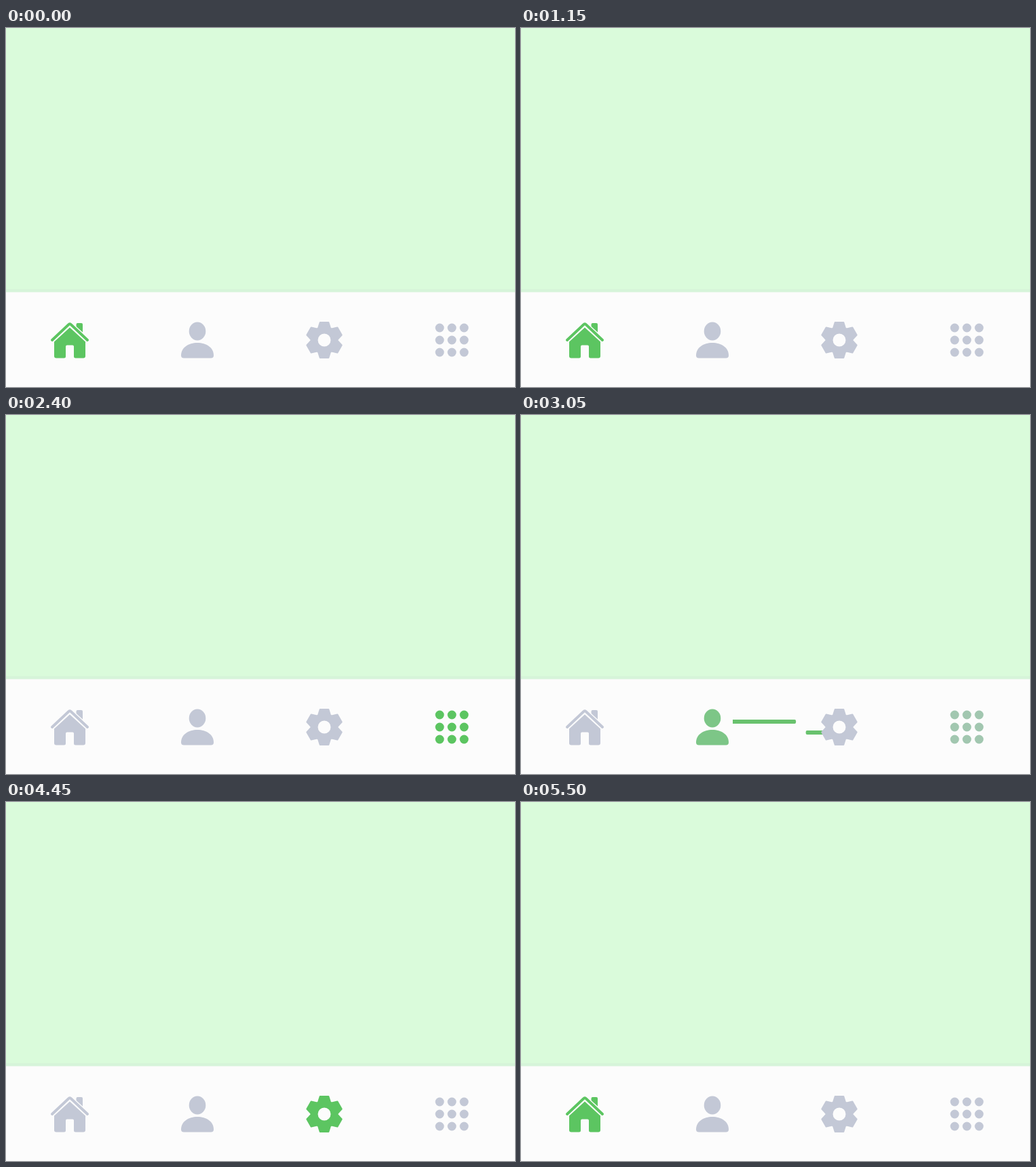
An HTML page that plays this animation: 750 px wide and 528 px high, repeating every 5.55 s.

```html
<!DOCTYPE html>
<html lang="en">
<head>
<meta charset="utf-8">
<title>Tab bar</title>
<style>
  html, body { margin: 0; width: 100%; height: 100%; overflow: hidden; background: #dafbdb; }
  svg { display: block; }
  #stage { width: 750px; height: 528px; }
  .streak { fill: #69c26e; }
</style>
</head>
<body>
<svg id="stage" viewBox="0 0 750 528">
  <rect width="750" height="528" fill="#dafbdb"/>
  <rect y="384" width="750" height="5" fill="#d6f4d9"/>
  <rect y="388.5" width="750" height="139.5" fill="#fcfcfc"/>
  <svg id="track" y="440" height="40" overflow="hidden">
    <rect class="streak" y="8" height="6" rx="2"/>
    <rect class="streak" y="24" height="6" rx="2"/>
  </svg>
  <g class="icon" transform="translate(94 459)">
    <path d="M9.5-14V-23Q9.5-25 11.5-25H17Q19-25 19-23V-7.5Z"/>
    <path d="M-27 0.5L0-24L27 0.5" fill="none" stroke="#fcfcfc" stroke-width="7"/>
    <path d="M0-18.5L23 2.5V23.5Q23 26.5 20 26.5H8.5Q6 26.5 6 24V9.5Q6 7.5 4 7.5H-4Q-6 7.5-6 9.5V24Q-6 26.5-8.5 26.5H-20Q-23 26.5-23 23.5V2.5Z"/>
    <path class="line" d="M-26 0L-2-22.5Q0-25 2-22.5L26 0" fill="none" stroke-width="4" stroke-linecap="round"/>
  </g>
  <g class="icon" transform="translate(282 459)">
    <ellipse cy="-13" rx="12.3" ry="13.4"/>
    <path d="M-24 22.5C-24 11-13 4 0 4S24 11 24 22.5Q24 26.5 20 26.5H-20Q-24 26.5-24 22.5Z"/>
  </g>
  <g class="icon" transform="translate(469 459)"><path id="gear" class="line" fill-rule="evenodd" stroke-width="2" stroke-linejoin="round"/></g>
  <g class="icon" id="dots" transform="translate(657 459)"></g>
</svg>
<script>
const LOOP = 5550, FADE = 400, PAD = 30;
const GRAY = [195, 200, 214], GREEN = [92, 197, 97];
const centers = [94, 282, 469, 657];
const moves = [
  { at: 1560, from: 0, to: 3 },
  { at: 2780, from: 3, to: 1 },
  { at: 3980, from: 1, to: 2 },
  { at: 5040, from: 2, to: 0 }
];
// start of the streak and the travel of its head, as shares of the track
const streaks = [{ start: .33, head: 1.3 }, { start: .01, head: 1.16 }];

const $ = id => document.getElementById(id);
const icons = [...document.querySelectorAll('.icon')];
const bars = [...document.querySelectorAll('.streak')];
const track = $('track');
const clamp = x => Math.max(0, Math.min(1, x));
const smooth = x => x * x * (3 - 2 * x);

function buildGear() {
  const tooth = [[-9, -17.5], [-6.3, -26], [6.3, -26], [9, -17.5]];
  const points = [];
  for (let i = 0; i < 6; i++) {
    const a = i * Math.PI / 3, c = Math.cos(a), s = Math.sin(a);
    for (const [x, y] of tooth) points.push([x * c - y * s, x * s + y * c].map(n => n.toFixed(2)).join(' '));
  }
  $('gear').setAttribute('d', `M${points.join('L')}ZM10.5 0A10.5 10.5 0 1 0-10.5 0A10.5 10.5 0 1 0 10.5 0Z`);
}

function buildDots() {
  let dots = '';
  for (let i = 0; i < 9; i++)
    dots += `<circle cx="${(i % 3 - 1) * 18}" cy="${(Math.floor(i / 3) - 1) * 18}" r="6.5"/>`;
  $('dots').innerHTML = dots;
}

function paint(icon, k) {
  const color = `rgb(${GRAY.map((g, i) => Math.round(g + (GREEN[i] - g) * k)).join()})`;
  icon.setAttribute('fill', color);
  for (const line of icon.querySelectorAll('.line')) line.setAttribute('stroke', color);
}

function drawStreaks(move, u) {
  const v = clamp((u - .3) / .7);
  const running = v > 0 && v < 1;
  track.style.display = running ? '' : 'none';
  if (!running) return;
  const a = centers[move.from], b = centers[move.to];
  const width = Math.abs(b - a) - 2 * PAD, e = smooth(v);
  track.setAttribute('x', Math.min(a, b) + PAD);
  track.setAttribute('width', width);
  streaks.forEach(({ start, head }, i) => {
    const tail = (start + (1 - start) * e) * width;
    const len = Math.max(8, (start + head * e) * width - tail);
    bars[i].setAttribute('x', b > a ? tail : width - tail - len);
    bars[i].setAttribute('width', len);
    bars[i].setAttribute('opacity', Math.min(1, v * 4));
  });
}

function frame() {
  const t = performance.now() % LOOP;
  const move = moves.filter(m => m.at <= t).pop() || moves[0];
  const u = clamp((t - move.at) / FADE);
  icons.forEach((icon, i) => paint(icon, i === move.to ? u : i === move.from ? 1 - u : 0));
  drawStreaks(move, u);
  requestAnimationFrame(frame);
}

buildGear();
buildDots();
frame();
</script>
</body>
</html>
```
